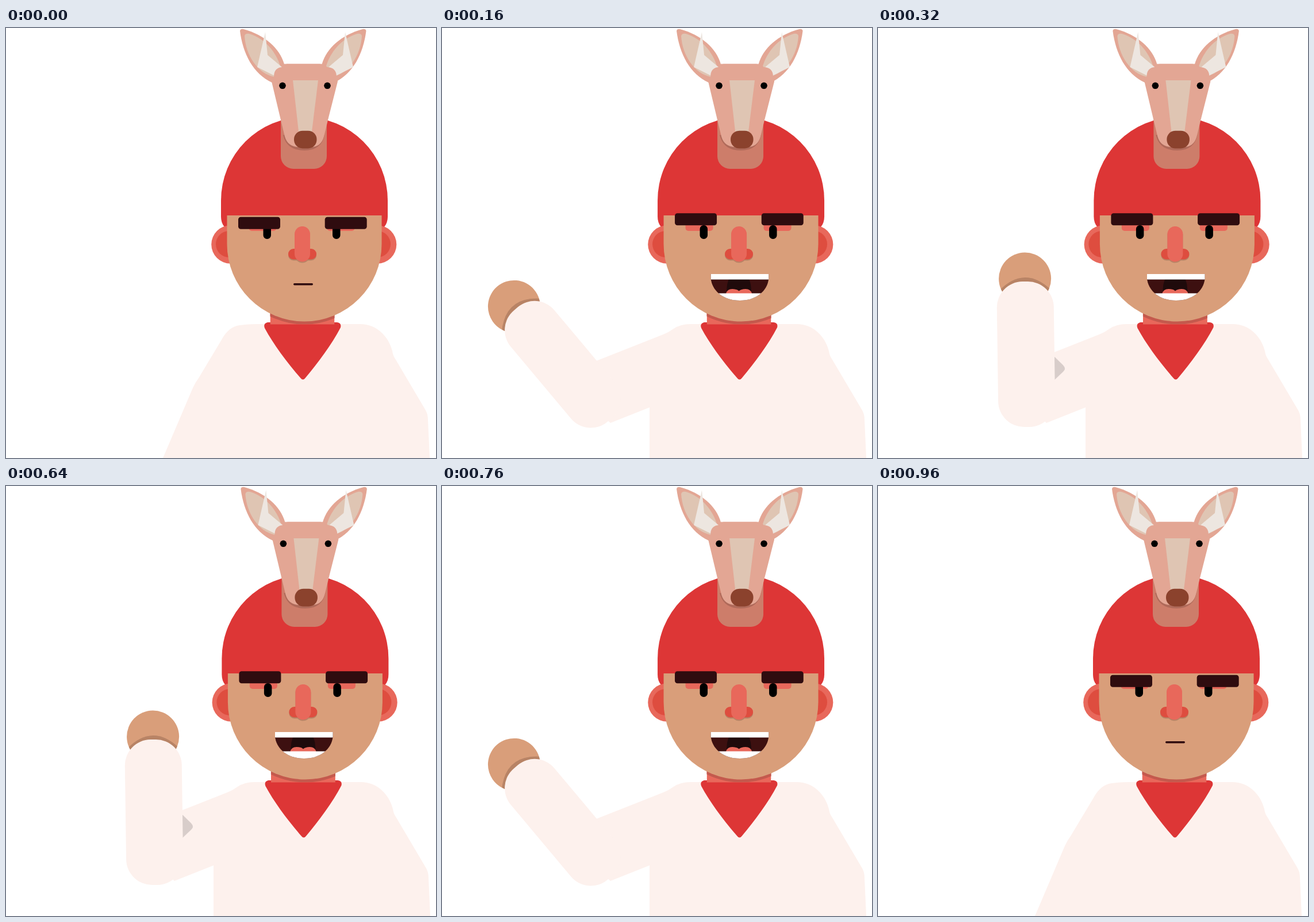
An HTML page that plays this animation: 748x748 px, repeating every 1000 ms.

```html
<!DOCTYPE html>
<html lang="en">
<head>
<meta charset="utf-8">
<title>Waving hello</title>
<style>
  html, body { margin: 0; width: 100%; height: 100%; overflow: hidden; background: #fff; }
  svg { display: block; width: 100vw; height: 100vh; animation: pose 1s step-end infinite; }

  @keyframes pose {
    0%, 96%, 100% { --dx: 0px; --turn: -83deg; --brow: 6.5px; --rest: 1; --oh: 0; --smile: 0; --fold: 0; --cloth: #fdf1ed; }
    8%, 84% { --dx: .7px; --turn: -83deg; --brow: 0px; --rest: 0; --oh: 1; --smile: 0; --fold: 0; --cloth: #fff0ed; }
    16%, 48%, 76% { --dx: 1.05px; --turn: -40deg; --brow: 0px; --rest: 0; --oh: 0; --smile: 1; --fold: 0; --cloth: #fdf1ed; }
    32%, 64% { --dx: 1.4px; --turn: -.8deg; --brow: 0px; --rest: 0; --oh: 0; --smile: 1; --fold: 1; --cloth: #fdf1ed; }
  }

  .drift { transform: translateX(var(--dx)); }
  .forearm { transform: translate(258.5px, 643px) rotate(var(--turn)); }
  .brows { transform: translateY(var(--brow)); }
  .rest { opacity: var(--rest); }
  .raised { opacity: calc(1 - var(--rest)); }
  .oh { opacity: var(--oh); }
  .smile { opacity: var(--smile); }
  .fold { opacity: var(--fold); fill: #d8cdca; }

  .cloth { fill: var(--cloth); }
  .skin { fill: #d99e7a; }
  .shade { fill: #b88365; }
  .red { fill: #dd3636; }
  .coral { fill: #e8685b; }
  .blush { fill: #de4d3f; }
  .ink { fill: #2f0c0f; }
  .mouth { fill: #3d1010; }
  .fur { fill: #e3a694; }
  .beige { fill: #dfc5b3; }
  .tuft { fill: #ede6e0; }
</style>
</head>
<body>
<svg viewBox="0 0 748 748">
  <defs>
    <clipPath id="palm"><circle cy="-207" r="45.5"/></clipPath>
    <clipPath id="throat"><rect x="459.5" y="480" width="112" height="35.5"/></clipPath>
    <clipPath id="lips"><path d="M466.6 428H567.2V436C565 458 545 474 517 474S469 458 466.6 436Z"/></clipPath>
    <path id="face" d="M384.5 326H653.5V376A134.5 134.5 0 0 1 384.5 376Z"/>
    <path id="ear" d="M407 5Q408 1 413 2C450 12 476 35 484 63L480 95H463C430 80 412 45 407 5Z"/>
    <path id="earIn" d="M415 14Q416 9 423 10C452 19 470 43 477 66L466 85C438 79 417 48 415 14Z"/>
    <path id="tuft" d="M451 7L455 47L480 68L467 83L437 68Z"/>
  </defs>

  <path class="cloth rest" d="M273 748L325 626Q329 617 335 609L374 544Q387 519 407 517Q420 515 437 515H616C645 515 666 537 672 562Q673 570 678 577L730 665Q734 672 734 682L737 748Z"/>

  <g class="raised">
    <g class="forearm">
      <circle class="skin" cy="-207" r="45.5"/>
      <path class="shade" clip-path="url(#palm)" d="M-45 -187Q0 -231 45 -187V-150H-45Z"/>
    </g>
    <path class="cloth" d="M361 748V660L293 687L262 660L241 590L385 533Q395 529 403 523Q415 515 432 515H617C646 515 667 537 673 562Q674 570 679 577L731 665Q735 672 735 682L738 748Z"/>
    <path class="fold" d="M304 569L322 586.5Q328 593 322 598L304 615Z"/>
    <rect class="cloth forearm" x="-49.5" y="-202" width="99" height="253" rx="45"/>
  </g>

  <g class="drift">
    <path class="red" d="M455 512H576Q584 513 582 521C567 550 543 582 520.500 609Q516.500 614 512.500 609C489 582 465 550 450 522Q447 514 455 512Z"/>
    <g clip-path="url(#throat)">
      <rect class="coral" x="459.500" y="480" width="112" height="36"/>
      <use href="#face" y="5" fill="#c4594d"/>
    </g>

    <path class="red" d="M374 300A145 145 0 0 1 664 300V328Q664 339 658 346H380Q374 339 374 328Z"/>
    <g class="coral"><circle cx="390.500" cy="376.500" r="33.300"/><circle cx="646" cy="376.500" r="33.300"/></g>
    <g class="blush"><circle cx="388" cy="376" r="23"/><circle cx="646" cy="376" r="23"/></g>
    <use href="#face" class="skin"/>

    <g class="coral">
      <rect x="422.500" y="335" width="48" height="18" rx="5"/>
      <rect x="558.500" y="335" width="48" height="18" rx="5"/>
    </g>
    <rect x="447.500" y="343" width="13.500" height="24" rx="6.500"/>
    <rect x="568" y="343" width="13.500" height="24" rx="6.500"/>
    <g class="ink brows">
      <rect x="404" y="322.300" width="73" height="21" rx="4.500"/>
      <rect x="554.700" y="322.300" width="73" height="21" rx="4.500"/>
    </g>

    <g class="shade">
      <rect x="491" y="386" width="49" height="18.500" rx="9"/>
      <rect x="502" y="347" width="27" height="61.500" rx="13.500"/>
    </g>
    <rect class="blush" x="491" y="384" width="49" height="18.500" rx="9"/>
    <rect class="coral" x="502" y="345" width="27" height="61.500" rx="13.500"/>

    <rect class="ink rest" x="500" y="444" width="34" height="3.500" rx="1.700"/>
    <ellipse class="mouth oh" cx="515.500" cy="452.300" rx="28" ry="21.300"/>
    <g class="smile"><g clip-path="url(#lips)">
      <rect class="mouth" x="466" y="428" width="102" height="46"/>
      <path fill="#1f0a0b" d="M498 437H533Q537 444 537 462H494Q494 444 498 437Z"/>
      <path class="coral" d="M493 462Q495 454 504 454Q512 454 515.500 457.500Q519 454 527 454Q536 454 538 462Z"/>
      <path fill="#fff" d="M466 428H568V437.500H466ZM466 461.500H568V475H466Z"/>
    </g></g>

    <!-- deer hat -->
    <rect x="478" y="135" width="80" height="110" rx="22" fill="#cd7d6a"/>
    <path fill="#b06a5a" d="M482 186Q488 213 519 213Q549 213 554 186Z"/>
    <g class="fur">
      <use href="#ear"/>
      <use href="#ear" transform="matrix(-1 0 0 1 1033.500 0)"/>
      <path d="M484 62.500H549.500L556 72H478Z"/>
    </g>
    <g class="beige">
      <use href="#earIn"/>
      <use href="#earIn" transform="matrix(-1 0 0 1 1034 0)"/>
    </g>
    <g class="tuft">
      <use href="#tuft"/>
      <use href="#tuft" transform="matrix(-1 0 0 1 1041 0)"/>
    </g>
    <path class="fur" d="M462 93L466 85Q466 68 482 68L488 62.500H546L559 68Q575 69 575 85L577 93L560 160L553 189Q548 207 530 207H508Q490 206 485 189L478 160Z"/>
    <path class="beige" d="M499 91H543L532 180H509Z"/>
    <rect x="501" y="178.700" width="39.500" height="30.800" rx="15" fill="#8b422d"/>
    <circle cx="481" cy="100.300" r="5.800"/>
    <circle cx="559" cy="100.300" r="5.800"/>
  </g>
</svg>
</body>
</html>
```
